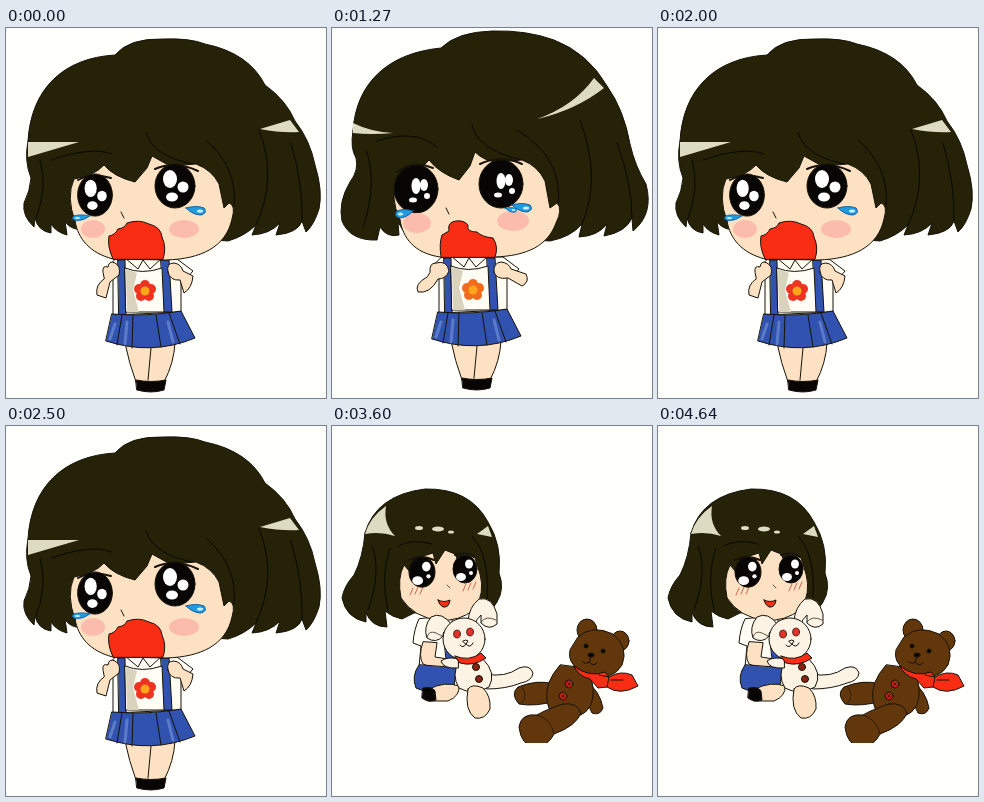
Animation, 320 px wide and 370 px high, one loop 4680 ms. Source, as an HTML page:

```html
<!DOCTYPE html>
<html>
<head>
<meta charset="utf-8">
<style>
html, body { margin: 0; width: 100%; height: 100%; overflow: hidden; background: #fffffb; }
svg { display: block; width: 320px; height: 370px; stroke-linejoin: round; stroke-linecap: round; }
.pose { display: none; stroke: #17130a; stroke-width: 1; fill: none; }
.hair { fill: #252208; }
.skin { fill: #fde1c3; }
.white { fill: #fffdf4; }
.fur { fill: #fdf3e4; }
.blue { fill: #3152ae; }
.red { fill: #f92d14; }
.bear { fill: #63370c; }
.dark { fill: #080604; }
.shine { fill: #dddbc2; stroke: none; }
.blush { fill: #fbbcae; stroke: none; }
.shade { fill: #d9d3bd; stroke: none; }
.plain { stroke: none; }
.thin { stroke-width: .7; }
.strand { stroke: #080702; }
</style>
</head>
<body>
<svg viewBox="0 0 320 370">
  <defs>
    <g id="eye">
      <ellipse class="dark" rx="20" ry="22"/>
      <g fill="#fff" stroke="none">
        <ellipse cx="-5" cy="-7" rx="7" ry="9"/>
        <circle cx="8" cy="1" r="5.5"/>
        <ellipse cx="-3" cy="11" rx="6" ry="4.5"/>
      </g>
    </g>
    <g id="wetEye">
      <ellipse class="dark" rx="22" ry="24"/>
      <g fill="#fff" stroke="none">
        <ellipse cx="0" cy="-3" rx="4.5" ry="8"/>
        <ellipse cx="8" cy="-4" rx="4" ry="6"/>
        <circle cx="11" cy="7" r="3"/>
        <ellipse cx="-3" cy="11" rx="4" ry="2.5"/>
      </g>
    </g>
    <g id="tear">
      <path d="M-10-3Q0-6 8-3Q12 2 5 4Q-3 4-10-3Z" fill="#219be0" stroke="#125d9c"/>
      <ellipse cx="4" cy="0" rx="3" ry="1.5" fill="#c9f1ff" stroke="none"/>
    </g>
    <g id="flower">
      <g class="plain">
        <circle cy="-6" r="5"/><circle cx="6" cy="-2" r="5"/><circle cx="4" cy="5" r="5"/>
        <circle cx="-4" cy="5" r="5"/><circle cx="-6" cy="-2" r="5"/>
      </g>
      <circle r="4.5" fill="#ffa51c" stroke="none"/>
    </g>
    <g id="body">
      <path class="skin" d="M119 315Q123 335 130 354H158Q168 335 169 315Z"/>
      <path d="M145 320L142 352"/>
      <path class="dark" d="M130 352Q145 355 160 352L158 362Q145 366 131 362Z"/>
      <path class="white" d="M110 231L171 231L187 243L181 250L175 250V284L107 287V250L103 238Z"/>
      <path class="blue" d="M112 232L119 232L120 287H113ZM155 232L163 232L166 284H158Z"/>
      <path class="white" d="M119 240Q136 247 156 240L158 284H120Z"/>
      <path class="shade" d="M120 241L131 245L127 262L133 284H121Z"/>
      <path class="white" d="M119 230L132 241L137 232L144 241L156 230Z"/>
      <path class="blue" d="M106 286Q142 289 175 283L189 310Q146 328 100 313Z"/>
      <path d="M116 287L111 317M127 287L126 320M150 287L155 319M163 285L174 316"/>
      <path d="M109 296L104 311M121 294L119 316M162 294L167 314" stroke="#5c7ccb" stroke-width="3"/>
    </g>
    <g id="bearBody">
      <path class="bear" d="M222 258Q206 253 186 261Q178 268 187 278Q203 281 224 275Z"/>
      <path class="bear" d="M254 255Q268 265 271 282Q268 290 260 287Q254 273 247 266Z"/>
      <path class="bear" d="M228 239Q212 257 215 274Q216 291 235 293Q259 290 261 271Q263 251 251 242Z"/>
      <path class="bear" d="M231 278Q213 284 205 289Q189 287 187 301Q189 320 204 321Q217 319 222 308Q244 300 249 287Q245 276 231 278Z"/>
      <path d="M205 289Q219 293 222 308M190 261Q196 269 190 277" class="thin"/>
      <g fill="#c4240f"><circle cx="237" cy="258" r="4"/><circle cx="231" cy="270" r="4"/></g>
      <path d="M235 256L239 260M239 256L235 260M229 268L233 272M233 268L229 272" class="thin"/>
      <ellipse class="bear" cx="255" cy="204" rx="10" ry="11"/>
      <ellipse class="bear" cx="288" cy="215" rx="9" ry="10"/>
      <path class="bear" d="M246 211Q260 198 281 208Q297 221 290 239Q281 255 259 249Q234 241 238 224Z"/>
      <g class="dark"><circle cx="254" cy="220" r="2"/><circle cx="271" cy="225" r="2"/>
      <ellipse cx="259" cy="229" rx="3" ry="2"/></g>
      <path d="M259 231L257 236Q253 239 250 235M257 236Q261 241 265 237"/>
    </g>
    <g id="sitting">
      <path class="white" d="M87 193Q82 203 81 217L89 220L87 241L121 242L120 190Z"/>
      <path class="blue" d="M111 201L117 199L123 239L115 240Z"/>
      <path class="skin" d="M91 216Q86 230 91 238Q105 245 119 241L122 234L103 231L105 217Z"/>
      <path class="blue" d="M87 239Q79 250 84 262Q99 270 122 261L124 242Z"/>
      <path class="skin" d="M97 263Q113 255 127 260Q128 270 116 275H96Z"/>
      <path class="dark" d="M91 262Q100 260 103 265L104 274Q96 277 90 272Z"/>
    </g>
    <g id="rabbit">
      <path class="fur" d="M154 248Q173 252 187 242Q198 238 201 247Q200 255 189 257Q174 263 155 263Z"/>
      <path class="fur" d="M127 234Q119 250 127 262Q141 270 157 261Q165 247 151 233Z"/>
      <path class="fur" d="M126 233Q116 230 109 235Q111 243 126 242Z"/>
      <path class="skin" d="M136 263Q140 257 151 262Q159 270 158 283Q153 294 143 292Q132 284 136 263Z"/>
      <path class="fur" d="M120 199Q110 185 99 191Q91 201 95 212Q104 218 111 210Q111 203 116 207Z"/>
      <path class="fur" d="M136 195Q137 181 147 173Q160 170 165 188V198Q157 205 149 197L149 189Q144 193 143 199Z"/>
      <path d="M95 211Q97 204 104 207L110 210M149 196Q154 189 164 194" class="thin"/>
      <ellipse class="fur" cx="132" cy="213" rx="21" ry="21"/>
      <path class="red" d="M123 230Q137 236 149 227L154 232Q141 241 128 237Z"/>
      <g fill="#892414"><circle cx="144" cy="241" r="3.5"/><circle cx="147" cy="253" r="3.5"/></g>
    </g>
    <g id="smallEye">
      <ellipse class="dark" rx="12" ry="14"/>
      <g fill="#fff" stroke="none"><ellipse cx="4" cy="-5" rx="4" ry="4.5"/>
      <circle cx="6" cy="4" r="2"/><ellipse cx="-4" cy="8" rx="5" ry="4"/></g>
    </g>
    <g id="seatedFace">
      <path class="skin" d="M69 172Q65 152 72 139L78 146L85 132L101 127L104 138L113 124L123 128L127 137L133 126L143 132L148 148Q153 167 143 183Q127 196 107 194Q82 192 69 172Z"/>
      <path d="M77 134Q89 128 102 134M123 129Q133 125 142 131" stroke-width="2"/>
      <path d="M81 162L78 169M86 161L83 168M91 161L88 168M134 158L131 165M139 157L136 164M144 156L141 163" stroke="#d0664f"/>
      <path d="M115 159L118 162" class="thin"/>
    </g>
    <g id="hairShine">
      <g class="shine">
        <path d="M33 108Q38 91 54 80Q51 98 63 110Q48 105 33 108Z"/>
        <ellipse cx="87" cy="102" rx="4" ry="2"/><ellipse cx="106" cy="103" rx="6" ry="2.5"/>
        <ellipse cx="119" cy="106" rx="3" ry="1.5"/>
        <path d="M145 108L156 100L160 111Z"/>
      </g>
      <path class="strand" d="M40 120Q50 145 36 184M58 122Q48 150 56 184M140 110Q158 130 155 172M66 120Q80 112 100 118"/>
    </g>
  </defs>

  <g class="pose">
    <use href="#body"/>
    <path class="skin" d="M97 244Q96 237 102 239Q103 232 109 235Q115 238 113 247L104 254L100 270L91 267Q89 257 98 251ZM162 244Q160 235 168 235Q175 236 177 243L187 248Q186 260 178 265L174 252Q164 253 162 244Z"/>
    <use href="#flower" x="139" y="263" fill="#ee3321"/>
    <path class="hair" d="M22 113C25 61 57 30 109 27Q123 10 157 11Q184 10 199 16Q243 25 259 57Q280 72 289 93Q304 112 309 137Q317 163 313 181Q308 197 300 204L296 193Q292 205 270 207L274 195Q264 206 246 207L250 197Q239 208 222 213L70 201Q62 199 59 193L61 207Q50 204 45 196V205Q32 203 29 190L28 199Q16 188 18 175Q24 163 25 150Q18 133 22 113Z"/>
    <path class="strand" d="M45 132Q85 118 106 126M140 105Q148 130 192 137M253 102Q272 150 250 197M285 115Q297 155 296 193M200 112Q232 140 228 178M34 132Q42 160 30 190"/>
    <path class="shine" d="M22 114L73 114Q49 121 22 129ZM254 101L284 92L293 104Q275 105 254 101Z"/>
    <path class="skin" d="M69 193Q60 169 68 151Q88 148 98 137Q108 149 129 154L141 140L146 128L164 138L190 136Q206 142 213 156L218 180L223 175Q230 177 226 191C220 219 195 231 160 232L107 231C84 225 72 211 69 193Z"/>
    <path d="M72 152Q86 144 105 150M149 141Q169 132 192 143" stroke-width="2"/>
    <use href="#eye" transform="translate(89 167) scale(.87 .96)"/>
    <use href="#eye" x="169" y="158"/>
    <ellipse class="blush" cx="87" cy="201" rx="12" ry="9"/>
    <ellipse class="blush" cx="178" cy="201" rx="15" ry="9"/>
    <use href="#tear" transform="translate(75 190) scale(-.9 .7)"/>
    <use href="#tear" x="190" y="183"/>
    <path d="M115 184L118 190"/>
    <path class="red" d="M107 231Q101 218 103 208Q109 207 112 201Q119 200 121 195Q133 191 143 196Q155 199 156 209Q161 220 157 231Z"/>
  </g>

  <g class="pose">
    <use href="#body" y="-2"/>
    <path class="skin" d="M98 244Q97 235 104 235Q115 232 117 243Q114 251 106 251Q98 266 86 264Q82 256 95 249ZM162 244Q161 235 169 234Q177 235 179 241L194 246Q198 254 190 258L176 250Q164 252 162 244Z"/>
    <use href="#flower" x="141" y="262" fill="#f36b1d"/>
    <path class="hair" d="M21 103C24 54 57 25 109 20Q125 4 160 3Q195 2 222 12Q256 25 275 58Q292 82 298 116Q303 138 314 156Q322 186 301 203L300 190Q294 204 272 208L275 196Q266 208 247 209L250 196Q239 209 218 213L72 204L66 194L67 207Q55 210 48 199L45 212Q18 213 10 193Q6 174 18 154Q27 142 24 130Q18 120 21 103Z"/>
    <path class="strand" d="M45 113Q85 100 106 120M140 97Q145 122 190 132M248 92Q270 150 250 196M285 115Q300 155 300 190M185 102Q232 130 226 178M34 122Q46 155 31 200"/>
    <path class="shine" d="M21 95Q39 104 61 105Q39 107 21 105ZM205 91Q242 78 262 50L272 60Q244 82 205 91Z"/>
    <path class="skin" d="M68 192Q57 168 66 151Q86 146 97 132Q107 145 127 152L138 138L143 124Q152 133 165 134L190 132Q206 138 213 153L218 180L225 175Q231 181 224 195C216 217 196 228 162 229L108 229C82 225 71 210 68 192Z"/>
    <path d="M65 144Q81 132 101 140M148 136Q168 126 190 136" stroke-width="2"/>
    <use href="#wetEye" x="84" y="161"/>
    <use href="#wetEye" x="169" y="156"/>
    <ellipse class="blush" cx="85" cy="195" rx="14" ry="10"/>
    <ellipse class="blush" cx="181" cy="193" rx="16" ry="10"/>
    <use href="#tear" transform="translate(72 186) scale(-.9 1)"/>
    <use href="#tear" x="190" y="180"/>
    <use href="#tear" transform="translate(179 182) scale(.6)"/>
    <path d="M114 180L117 186"/>
    <path class="red" d="M109 229Q107 215 110 207L117 203Q115 194 124 193Q132 192 136 197Q134 204 145 204Q150 209 161 210Q167 219 163 229Z"/>
  </g>

  <g class="pose">
    <use href="#sitting"/>
    <path class="hair" d="M13 179Q31 161 33 107Q44 69 93 63Q138 62 155 96Q169 119 167 147Q172 163 166 173Q161 184 147 182L81 185L70 190Q59 190 54 184L56 197Q40 197 34 185L35 194Q23 192 13 179Z"/>
    <use href="#hairShine"/>
    <use href="#seatedFace"/>
    <use href="#smallEye" x="91" y="146"/>
    <use href="#smallEye" transform="translate(132 140) scale(.9)"/>
    <path d="M109 176Q114 179 118 176"/>
    <use href="#rabbit"/>
    <g fill="#d72c22" class="thin"><ellipse cx="125" cy="207" rx="2" ry="4.5"/><ellipse cx="138" cy="210" rx="2" ry="4.5"/></g>
    <path d="M131 214L135 217M135 214L131 217M133 217V220M130 222L133 219L137 222"/>
    <use href="#bearBody"/>
    <path class="red" d="M242 240Q257 252 273 246L276 249L298 245Q302 254 309 259Q293 269 274 260L265 261L258 253Q246 250 242 240Z"/>
    <path d="M267 248L276 249L274 260M276 252L290 255"/>
  </g>

  <g class="pose">
    <use href="#sitting"/>
    <path class="hair" d="M33 107Q44 69 93 63Q138 62 156 96Q170 119 167 147Q173 163 165 176Q159 188 146 183L82 187L70 193Q60 191 53 185L55 201Q40 201 34 187V196Q14 192 10 172Q12 160 22 149Q31 131 33 107Z"/>
    <use href="#hairShine"/>
    <use href="#seatedFace"/>
    <use href="#smallEye" transform="translate(90 146) scale(1.08)"/>
    <use href="#smallEye" x="133" y="143"/>
    <path class="red" d="M106 174Q112 177 118 174Q117 182 111 181Q107 179 106 174Z"/>
    <use href="#rabbit"/>
    <g fill="#e43129" class="thin"><ellipse cx="125" cy="208" rx="3.5" ry="4"/><ellipse cx="138" cy="206" rx="3.5" ry="4"/></g>
    <path d="M131 215Q134 213 136 215L134 218ZM134 218Q131 223 128 219M134 218Q138 223 141 217"/>
    <clipPath id="ground"><path d="M175 185H320V317H175Z"/></clipPath>
    <g clip-path="url(#ground)"><use href="#bearBody"/></g>
    <path class="red" d="M242 240Q257 252 273 246L277 251Q289 244 300 249L306 260Q288 270 275 261L266 262L258 253Q246 250 242 240Z"/>
    <path d="M267 249L277 251L275 261M279 254L291 254"/>
  </g>
</svg>
<script>
const LOOP = 4680;
const poses = document.querySelectorAll('.pose');
// [start in ms, pose]
const cues = [[0, 0], [180, 1], [1720, 0], [2700, 2], [3170, 3]];

function draw(now) {
  const t = now % LOOP;
  const pose = cues.findLast(([start]) => t >= start)[1];
  poses.forEach((p, i) => p.style.display = i === pose ? 'inline' : 'none');
  requestAnimationFrame(() => draw(performance.now()));
}
draw(performance.now());
</script>
</body>
</html>
```
